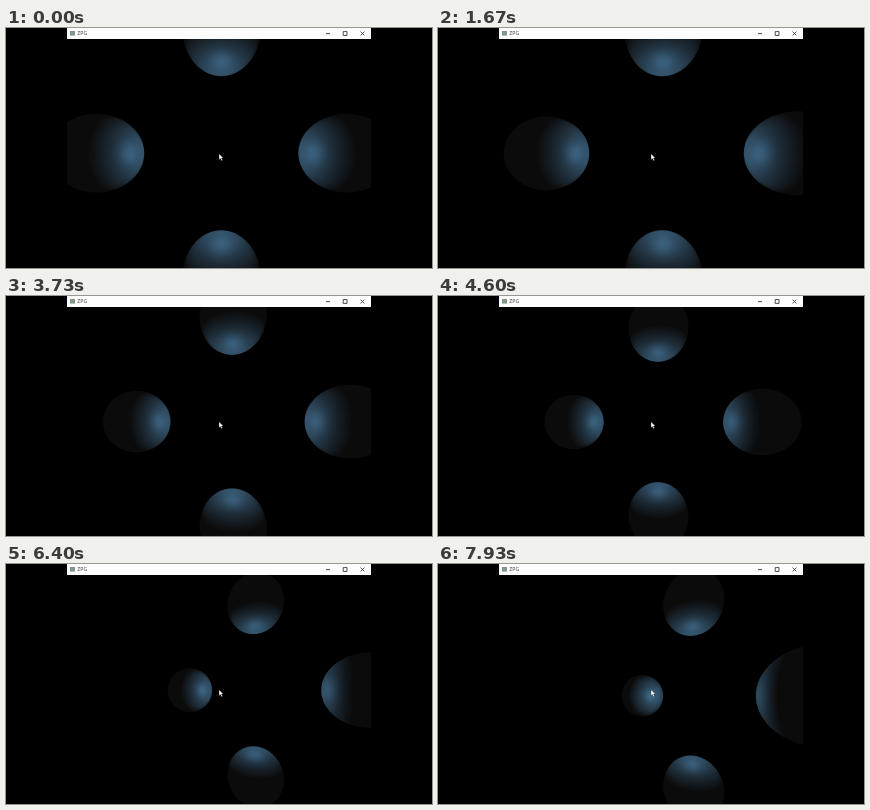
An HTML page with a canvas that plays this animation: 426x240 px, repeating every 8000 ms.

```html
<!DOCTYPE html>
<html lang="en">
<head>
<meta charset="utf-8">
<title>ZPG</title>
<style>
  html, body { margin: 0; width: 100%; height: 100%; overflow: hidden; background: #000; }
  canvas, svg { position: absolute; left: 0; top: 0; width: 426px; height: 240px; }
  text { font: 5.2px "Open Sans", sans-serif; fill: #333; }
  .buttons { fill: none; stroke: #222; stroke-width: .8; }
  .cursor { animation: nudge 8s step-end infinite; }
  @keyframes nudge {
    0%, 75% { transform: none; }
    58% { transform: translateX(-1.3px); }
  }
</style>
</head>
<body>
<canvas width="426" height="240"></canvas>
<svg viewBox="0 0 426 240">
  <rect x="61" width="304" height="11" fill="#fdfdfd"/>
  <rect x="64" y="3" width="5" height="4.6" fill="#84958a"/>
  <text x="71.3" y="7.4">ZPG</text>
  <path class="buttons" d="M320 5.6h4M337.2 3.6h3.8v3.8h-3.8zM354.6 3.6l3.8 3.8m0-3.8l-3.8 3.8"/>
  <path class="cursor" d="M213 125.7v6l1.4-1.2 1 2.2 1.1-.5-1-2.1h1.8z" fill="#fff" stroke="#000" stroke-width=".3"/>
</svg>
<script>
const LOOP = 8000;
const VIEW = { left: 61, right: 365, top: 11, bottom: 240, middle: 213 };
const FOCAL = 175;
const ORBIT = 3.1; // distance of each unit ball from the lamp
const AMBIENT = 11;
const TINT = [54, 97, 130];

// Where the lamp stands as seen from the camera, and how far the scene is turned.
const PATH = [
  { time: 550, x: .065, depth: 4.56, turn: 0, horizon: 125.2 },
  { time: 2400, x: .48, depth: 4.57, turn: .15, horizon: 125.3 },
  { time: 3730, x: .42, depth: 5.32, turn: .154, horizon: 125.6 },
  { time: 5530, x: .06, depth: 6.6, turn: .226, horizon: 126.4 },
  { time: 6400, x: 1.31, depth: 6.4, turn: .56, horizon: 126.2 },
  { time: 7930, x: 1.42, depth: 5.98, turn: .94, horizon: 131.7 }
];

const ctx = document.querySelector('canvas').getContext('2d');
const image = ctx.createImageData(426, 240);

const dot = (a, b) => a[0] * b[0] + a[1] * b[1] + a[2] * b[2];
const mix = (a, b, k) => a.map((value, i) => value + b[i] * k);
const unit = a => a.map(value => value / Math.hypot(...a));

function cameraAt(time) {
  const next = PATH.findIndex(key => key.time > time);
  if (next <= 0) return PATH[next ? PATH.length - 1 : 0];
  const a = PATH[next - 1], b = PATH[next];
  const k = (time - a.time) / (b.time - a.time);
  const camera = {};
  for (const name in a) camera[name] = a[name] + (b[name] - a[name]) * k;
  return camera;
}

// Diffuse light plus a broad, soft highlight.
function shadeAt(point, normal, lamp) {
  const toLamp = unit(mix(lamp, point, -1));
  const facing = dot(normal, toLamp);
  if (facing <= 0) return 0;
  const mirrored = mix(toLamp, normal, -2 * facing);
  const glint = Math.max(0, dot(mirrored, unit(point)));
  return .75 * facing + .25 * glint ** 5;
}

function drawBall(ball, lamp, horizon) {
  const distance = dot(ball, ball);
  const edge = FOCAL / ball[2];
  for (let y = VIEW.top; y < VIEW.bottom; y++) {
    for (let x = VIEW.left; x < VIEW.right; x++) {
      const rx = (x + .5 - VIEW.middle) / FOCAL;
      const ry = (y + .5 - horizon) / FOCAL;
      const length = Math.sqrt(rx * rx + ry * ry + 1);
      const along = (ball[0] * rx + ball[1] * ry + ball[2]) / length;
      const miss = Math.sqrt(Math.max(0, distance - along * along));
      const cover = Math.min(1, (1 - miss) * edge + .5);
      if (cover <= 0) continue;
      const hit = along - Math.sqrt(Math.max(0, 1 - miss * miss));
      const point = [rx, ry, 1].map(value => value * hit / length);
      const shade = shadeAt(point, unit(mix(point, ball, -1)), lamp);
      const p = (y * 426 + x) * 4;
      TINT.forEach((tint, c) => { image.data[p + c] = cover * (AMBIENT + tint * shade); });
    }
  }
}

function render(time) {
  const { x, depth, turn, horizon } = cameraAt(time);
  const lamp = [x, 0, depth];
  const across = [Math.cos(turn), 0, -Math.sin(turn)];
  const down = [0, 1, 0];
  new Uint32Array(image.data.buffer).fill(0xff000000);
  for (const axis of [across, down]) {
    for (const side of [-ORBIT, ORBIT]) drawBall(mix(lamp, axis, side), lamp, horizon);
  }
  ctx.putImageData(image, 0, 0);
}

function tick() {
  render(performance.now() % LOOP);
  requestAnimationFrame(tick);
}
tick();
</script>
</body>
</html>
```
